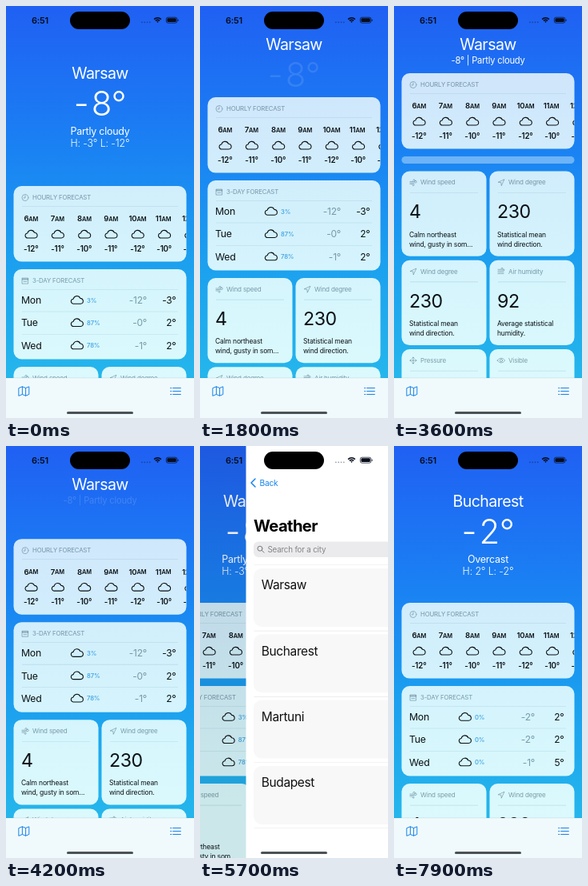
Write an HTML page with a canvas that moves like this. It is 235 px wide and 515 px high and loops after 8000 ms.

```html
<!DOCTYPE html>
<html lang="en">
<head>
<meta charset="utf-8">
<title>Weather</title>
<style>
  html, body { margin: 0; width: 100%; height: 100%; overflow: hidden; }
  canvas { display: block; width: 100vw; height: 100vh; }
</style>
</head>
<body>
<canvas></canvas>
<script>
const W = 235, H = 515, LOOP = 8000;
const canvas = document.querySelector('canvas');
const ctx = canvas.getContext('2d');
const BLUE = '#1684ea', INK = '#0b1116', MUTED = 'rgba(30,65,85,.5)', LINE = 'rgba(20,70,100,.17)';

const clamp = (v, lo = 0, hi = 1) => Math.min(hi, Math.max(lo, v));
const ramp = (t, from, to) => clamp((t - from) / (to - from));

function verticalGradient(...stops) {
  const gradient = ctx.createLinearGradient(0, 0, 0, H);
  stops.forEach(([at, color]) => gradient.addColorStop(at, color));
  return gradient;
}
const SKY = verticalGradient([0, '#2060f3'], [.35, '#1a82f3'], [.6, '#1b9eef'], [.9, '#25b6ec']);
const GLASS = verticalGradient([.15, '#cfe5fb'], [.5, '#d2f0fc'], [.75, '#d7f7fd'], [.92, '#dcfafd']);

// Scroll keys: time, offset, velocity in px/ms
const SCROLL = [
  [1150, 0, 0], [1800, 111, 0], [2340, 111, 0], [2900, 231, .2],
  [3350, 270, 0], [4200, 109, -.16], [4900, 29, 0]
];

function scrollAt(t) {
  if (t <= SCROLL[0][0]) return SCROLL[0][1];
  const i = SCROLL.findIndex(key => key[0] > t);
  if (i < 0) return SCROLL.at(-1)[1];
  const [t0, a, va] = SCROLL[i - 1], [t1, b, vb] = SCROLL[i];
  const d = t1 - t0, u = (t - t0) / d, r = 1 - u;
  return a * (1 + 2 * u) * r * r + va * d * u * r * r + b * u * u * (3 - 2 * u) - vb * d * u * u * r;
}

// Critically damped spring: the share of the way still to go
const spring = ms => ms <= 0 ? 1 : (1 + .0163 * ms) * Math.exp(-.0163 * ms);
const coverAt = t => t < 7100 ? 1 - spring(t - 5534) : spring(t - 7100);

const CITIES = [
  { name: 'Warsaw', temp: '-8°', sky: 'Partly cloudy', range: 'H: -3° L: -12°', time: '4:50 AM',
    days: [['Mon', '3%', '-12°', '-3°'], ['Tue', '87%', '-0°', '2°'], ['Wed', '78%', '-1°', '2°']] },
  { name: 'Bucharest', temp: '-2°', sky: 'Overcast', range: 'H: 2° L: -2°', time: '5:50 AM',
    days: [['Mon', '0%', '-2°', '2°'], ['Tue', '0%', '-2°', '2°'], ['Wed', '0%', '-1°', '5°']] },
  { name: 'Martuni', sky: 'Clear', time: '7:50 AM' },
  { name: 'Budapest', sky: 'Mist', time: '4:50 AM' }
];
const HOURS = [['6', -12], ['7', -11], ['8', -10], ['9', -11], ['10', -12], ['11', -10], ['12', -10]];
const degree = ['plane', 'Wind degree', '230', 'Statistical mean', 'wind direction.'];
const TILES = [
  ['wind', 'Wind speed', '4', 'Calm northeast', 'wind, gusty in som...'], degree,
  degree, ['humid', 'Air humidity', '92', 'Average statistical', 'humidity.'],
  ['arrows', 'Pressure', '1012', 'Average pressure', 'at sea level.'],
  ['eye', 'Visible', '10', 'Average visibility', 'in kilometers.']
];

const ICONS = {
  cloud: 'M-4.5 4.5a3 3 0 0 1-.3-6a4.5 4.5 0 0 1 8.6-.8a3.4 3.4 0 0 1 .4 6.8z',
  clock: 'M4 0a4 4 0 1 1-8 0a4 4 0 1 1 8 0M0-2.5V.4H-2',
  calendar: 'M-3.6-3.4H3.6V3.6H-3.6zM-3.6-2.4H3.6M-3.6-1.4H3.6M-2 1H2',
  wind: 'M-4-1H1a1.3 1.3 0 1 0-1.3-1.3M-4 .5H3a1.3 1.3 0 1 0-1.3-1.5M-4 2H0a1.1 1.1 0 1 1-1 1.3',
  plane: 'M3.6-3.6L-3.8-.2L-.2 .2L.2 3.8z',
  humid: 'M-4-2.5H1a1 1 0 1 0-1-1M-4-.8H3a1 1 0 1 0-1-1M-4 1H3M-4 2.8H-1M0 2.8H3',
  arrows: 'M0-4V4M-4 0H4M-1.3-2.7L0-4L1.3-2.7M-1.3 2.7L0 4L1.3 2.7M-2.7-1.3L-4 0L-2.7 1.3M2.7-1.3L4 0L2.7 1.3',
  eye: 'M-4.8 0Q0-6 4.8 0Q0 6-4.8 0zM1.6 0a1.6 1.6 0 1 1-3.2 0a1.6 1.6 0 1 1 3.2 0',
  map: 'M-6.3-4L-2.1-5.7L2.1-4L6.3-5.7V4L2.1 5.7L-2.1 4L-6.3 5.7zM-2.1-5.7V4M2.1-4V5.7',
  list: 'M-6.3-4h1M-6.3 0h1M-6.3 4h1M-3.3-4H6.3M-3.3 0H6.3M-3.3 4H6.3',
  back: 'M2.5-5L-2.5 0L2.5 5',
  search: 'M2-.8a3 3 0 1 1-6 0a3 3 0 1 1 6 0M1.2 1.4L4 4.2'
};
for (const key in ICONS) ICONS[key] = new Path2D(ICONS[key]);

function group(draw, { x = 0, y = 0, alpha = 1 } = {}) {
  ctx.save();
  ctx.translate(x, y);
  ctx.globalAlpha *= alpha;
  draw();
  ctx.restore();
}

// y is the middle of the capitals
function text(str, x, y, size, color = INK, { weight = 400, align = 'left', track = -.02 } = {}) {
  ctx.font = `${weight} ${size}px Inter, sans-serif`;
  ctx.letterSpacing = `${track * size}px`;
  ctx.textAlign = align;
  ctx.fillStyle = color;
  ctx.fillText(str, x, y + size * .364);
  return ctx.measureText(str).width;
}

function icon(name, x, y, color = MUTED, width = .7) {
  group(() => {
    ctx.strokeStyle = color;
    ctx.lineWidth = width;
    ctx.lineJoin = ctx.lineCap = 'round';
    ctx.stroke(ICONS[name]);
  }, { x, y });
}

function rect(x, y, w, h, color, radius = 0) {
  ctx.fillStyle = color;
  ctx.beginPath();
  ctx.roundRect(x, y, w, h, radius);
  ctx.fill();
}

const rule = (x, y, w, color = LINE) => rect(x, y, w, .6, color);

function clipTo(x, y, w, h, radius = 0) {
  ctx.beginPath();
  ctx.roundRect(x, y, w, h, radius);
  ctx.clip();
}

const card = (x, y, w, h) => rect(x, y, w, h, GLASS, Math.min(10, h / 2));

function drawHeader(city, s, t) {
  const white = (str, y, size, weight, track) =>
    text(str, W / 2, y, size, '#fff', { weight, align: 'center', track });
  const returning = t > 3350 ? ramp(t, 4200, 4450) : 1;
  const compact = ramp(t, 2500, 2750) * (1 - ramp(t, 4000, 4240));
  group(() => {
    white(city.name, 84.3, 19.6, 400, -.03);
    group(() => white(city.temp.replace('-', '-\u200a'), 122, 42, 300, -.01),
      { alpha: clamp((119 - s) / 70) * returning });
    group(() => {
      white(city.sky, 156.3, 12.5, 400);
      white(city.range, 171.5, 12.4, 300, -.01);
    }, { alpha: clamp((100 - s) / 60) * returning });
  }, { y: -Math.min(36, s * .52) });
  group(() => white(`${city.temp} | ${city.sky}`, 68, 11.2, 400), { alpha: compact });
}

// A wide card whose rows slide under its header while it shrinks
function section(top, height, symbol, label, rowsTop, drawRows) {
  if (height <= 0) return;
  group(() => {
    card(9.5, top, 216, height);
    clipTo(9.5, top, 216, height, Math.min(10, height / 2));
    icon(symbol, 24, top + 14.5);
    text(label, 33, top + 14.5, 7.8, MUTED);
    rule(20, top + 25, 195);
    clipTo(9.5, top + 25, 216, Math.max(0, height - 25));
    group(drawRows, { y: rowsTop });
  }, { alpha: clamp(height / 20) });
}

function drawHours() {
  HOURS.forEach(([hour, temp], i) => {
    const x = 31.7 + i * 33.3, bold = { weight: 600 };
    const suffix = hour === '12' ? 'PM' : 'AM';
    const left = x - (hour.length > 1 ? 11.5 : 9.3);
    const w = text(hour, left, 41, 9.6, INK, bold);
    text(suffix, left + w, 41.5, 7.4, INK, bold);
    icon('cloud', x, 60.5, INK, 1.1);
    text(temp + '°', x - .5, 78.5, 9.8, INK, { weight: 600, align: 'center' });
  });
}

function drawDays(days) {
  days.forEach(([day, rain, low, high], i) => {
    const y = 38.7 + i * 28.3;
    text(day, 19, y, 12.3);
    icon('cloud', 89, y, INK, 1.1);
    text(rain, 101, y, 7.7, '#3a9fe0', { weight: 500 });
    text(low, 176, y, 12, MUTED, { align: 'right' });
    text(high, 212.5, y, 12, INK, { align: 'right' });
    if (i < 2) rule(20, y + 14, 195);
  });
}

function drawTile([symbol, title, value, line1, line2], x, y) {
  card(x, y, 106, 106.3);
  group(() => {
    icon(symbol, 14.5, 14);
    text(title, 23.5, 14, 8, MUTED);
    rule(10.5, 26.8, 85);
    text(value, 9.5, 50.5, 23.2);
    text(line1, 9.5, 79, 8.5);
    text(line2, 9.5, 91, 8.5);
  }, { x, y });
}

function drawHome(city, s, t) {
  rect(0, 0, W, H, SKY);
  drawHeader(city, s, t);

  const grid = 451 - s;
  const hourly = Math.max(84, 225 - s), daily = Math.max(188, 329 - s);
  section(hourly, Math.min(94.6, grid - 9.5 - hourly), 'clock', 'HOURLY FORECAST', hourly, drawHours);
  section(daily, grid - 9.5 - daily, 'calendar', '3-DAY FORECAST', 329 - s, () => drawDays(city.days));
  TILES.forEach((tile, i) => drawTile(tile, 9.5 + i % 2 * 110, grid + Math.floor(i / 2) * 111.3));
}

function drawToolbar() {
  rect(0, 465, W, 50, '#f0fafc');
  rule(0, 464.6, W, 'rgba(0,60,90,.12)');
  icon('map', 22.5, 481.5, BLUE, 1);
  icon('list', 212, 481.5, BLUE, 1.2);
}

function drawList(loaded) {
  rect(0, 0, W, H, '#fff');
  icon('back', 9, 46, BLUE, 1.5);
  text('Back', 17, 46, 10.2, BLUE);
  text('Weather', 9.5, 100, 20.2, '#000', { weight: 700, track: -.03 });
  rect(9.5, 119.5, 216, 19.5, '#ebebed', 6);
  icon('search', 18.5, 129, '#77777c', 1);
  text('Search for a city', 27, 129, 9.8, '#85858a');
  CITIES.forEach((city, i) => {
    group(() => {
      rule(10, -4.5, 225, '#e7e7e9');
      rect(9.5, 0, 216, 73, '#f8f8f8', 10);
      text(city.name, 19.3, 20.6, 15.5, '#111', { track: -.025 });
      if (!loaded) return;
      text(city.time, 19.3, 35.5, 7.5, '#85858a');
      text(city.sky, 19.3, 58, 7.9, '#85858a');
    }, { y: 153 + i * 82.3 });
  });
  rule(10, 477.5, 225, '#e7e7e9');
}

function drawSystem() {
  rect(80, 7, 75, 22, '#000', 11);
  text('6:51', 42.5, 18, 11, '#080d1c', { weight: 600, align: 'center' });
  for (let i = 0; i < 4; i++) rect(169 + i * 3.3, 19.4, 1.8, 1.8, 'rgba(10,20,40,.4)', .9);
  ctx.strokeStyle = '#080d1c';
  ctx.lineWidth = 1.6;
  ctx.lineCap = 'butt';
  for (const r of [1, 3.6, 6.2]) {
    ctx.beginPath();
    ctx.arc(189.5, 21, r, -Math.PI * .75, -Math.PI * .25);
    ctx.stroke();
  }
  ctx.lineWidth = .7;
  ctx.beginPath();
  ctx.roundRect(200.3, 14.2, 13.6, 7, 2.2);
  ctx.stroke();
  rect(201.4, 15.3, 11.4, 4.8, '#080d1c', 1.3);
  rect(214.6, 16.5, .9, 2.4, '#080d1c', .5);
  rect(76, 507, 83, 3, '#4b5256', 1.5);
}

function frame() {
  const t = performance.now() % LOOP;
  const w = Math.round(innerWidth * devicePixelRatio), h = Math.round(innerHeight * devicePixelRatio);
  if (canvas.width !== w || canvas.height !== h) Object.assign(canvas, { width: w, height: h });
  ctx.setTransform(w / W, 0, 0, h / H, 0, 0);

  const cover = coverAt(t);
  const city = CITIES[t < 7100 ? 0 : 1];
  group(() => drawHome(city, scrollAt(t), t), { x: -.3 * W * cover });
  rect(0, 0, W, H, `rgba(0,0,0,${.1 * cover})`);
  if (t < 5500) drawToolbar();
  else if (t > 7100) group(drawToolbar, { x: -W * cover });
  if (cover > .001) group(() => drawList(t >= 5900), { x: W * (1 - cover) });
  drawSystem();
  requestAnimationFrame(frame);
}
frame();
</script>
</body>
</html>
```
